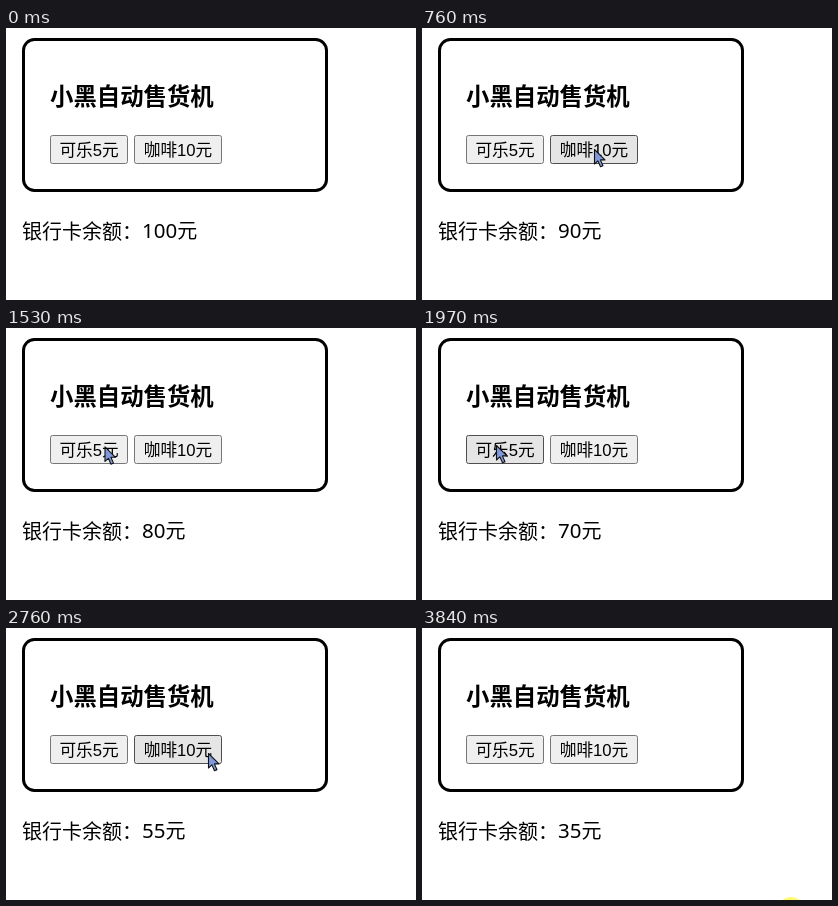
Animation of 410 by 272 pixels, one loop 3.9 s. Source, as an HTML page:

```html
<!DOCTYPE html>
<html lang="zh-CN">
<head>
<meta charset="utf-8">
<title>自动售货机</title>
<style>
  html, body { margin: 0; width: 100%; height: 100%; overflow: hidden; background: #fff; }
  svg { display: block; width: 410px; height: 272px; }
  text { font-family: "Noto Sans CJK SC", "Noto Sans CJK", "Noto Sans CJK JP", sans-serif; font-size: 20px; }
  .title { font-size: 23.4px; font-weight: 700; }
  .label, .unit { font-weight: 300; }
  #balance { font-family: "Noto Sans", "Open Sans", sans-serif; font-size: 20.5px; }
  .button text { font-family: "Liberation Sans", "Noto Sans CJK SC", "Noto Sans CJK", sans-serif; font-size: 16.67px; text-anchor: middle; }
  .button rect { fill: #efefef; stroke: #767676; }
  .button.hover rect { fill: #e5e5e5; stroke: #4f4f4f; }
  .button.active rect { fill: #f5f5f5; stroke: #8d8d8d; }
  #halo { fill: #fff96e; mix-blend-mode: multiply; }
</style>
</head>
<body>
<svg viewBox="0 0 410 272">
  <rect x="17.5" y="11.5" width="303" height="151" rx="11" fill="#fff" stroke="#000" stroke-width="3"/>
  <text class="title" x="44" y="77">小黑自动售货机</text>
  <g class="button" id="cola">
    <rect x="44.5" y="107.5" width="77" height="28" rx="2"/>
    <text x="83" y="128">可乐5元</text>
  </g>
  <g class="button" id="coffee">
    <rect x="128.5" y="107.5" width="87" height="28" rx="2"/>
    <text x="172" y="128">咖啡10元</text>
  </g>
  <text class="label" x="16" y="210.5">银行卡余额：</text>
  <text x="136" y="210"><tspan id="balance">100</tspan><tspan class="unit">元</tspan></text>
  <path id="arrow" d="M.5 .5V15L3.9 11.9L6.5 17.8L9 16.7L6.4 10.9H11Z" fill="#8099dc" stroke="#111" stroke-width="1.1" stroke-linejoin="round"/>
  <circle id="halo" r="14"/>
</svg>
<script>
  const LOOP = 3900, STEP = 65, PRESS = 120;
  const home = { x: 369, y: 283 };

  // Each stop: when the pointer sets off, steps to get there, and click release times.
  const stops = [
    { start: 110, steps: 8, x: 172, y: 121, target: "coffee", price: 10, clicks: [760, 1450] },
    { start: 1450, steps: 4, x: 74, y: 117, target: "cola", price: 5, clicks: [1790, 1970, 2170] },
    { start: 2170, steps: 4, x: 202, y: 125, target: "coffee", price: 10, clicks: [2760, 3200, 3380] },
    { start: 3380, steps: 4, ...home, price: 0, clicks: [3960] }
  ];

  const el = id => document.getElementById(id);
  const [cola, coffee, balance, arrow, halo] =
    ["cola", "coffee", "balance", "arrow", "halo"].map(el);
  const ease = (from, to, p, power) => to + (from - to) * (1 - p) ** power;

  function pointerAt(t) {
    const i = stops.findLastIndex(s => t >= s.start);
    if (i < 0) return { ...home, pressed: false };
    const stop = stops[i], from = stops[i - 1] || home;
    const p = Math.min(1, (Math.floor((t - stop.start) / STEP) + 1) / stop.steps);
    return {
      x: ease(from.x, stop.x, p, 2),
      y: ease(from.y, stop.y, p, 1.5),
      over: p === 1 ? stop.target : undefined,
      pressed: stop.clicks.some(end => t >= end - PRESS && t < end)
    };
  }

  function draw(t) {
    const { x, y, over, pressed } = pointerAt(t);
    for (const part of [arrow, halo]) part.setAttribute("transform", `translate(${x} ${y})`);
    halo.setAttribute("visibility", pressed ? "visible" : "hidden");
    for (const button of [cola, coffee]) {
      const on = over === button.id;
      button.classList.toggle("hover", on);
      button.classList.toggle("active", on && pressed);
    }
    const spent = stops.reduce((sum, s) => sum + s.price * s.clicks.filter(end => t >= end).length, 0);
    balance.textContent = 100 - spent;
  }

  const start = performance.now();
  function tick() {
    draw((performance.now() - start) % LOOP);
    requestAnimationFrame(tick);
  }
  tick();
</script>
</body>
</html>
```
